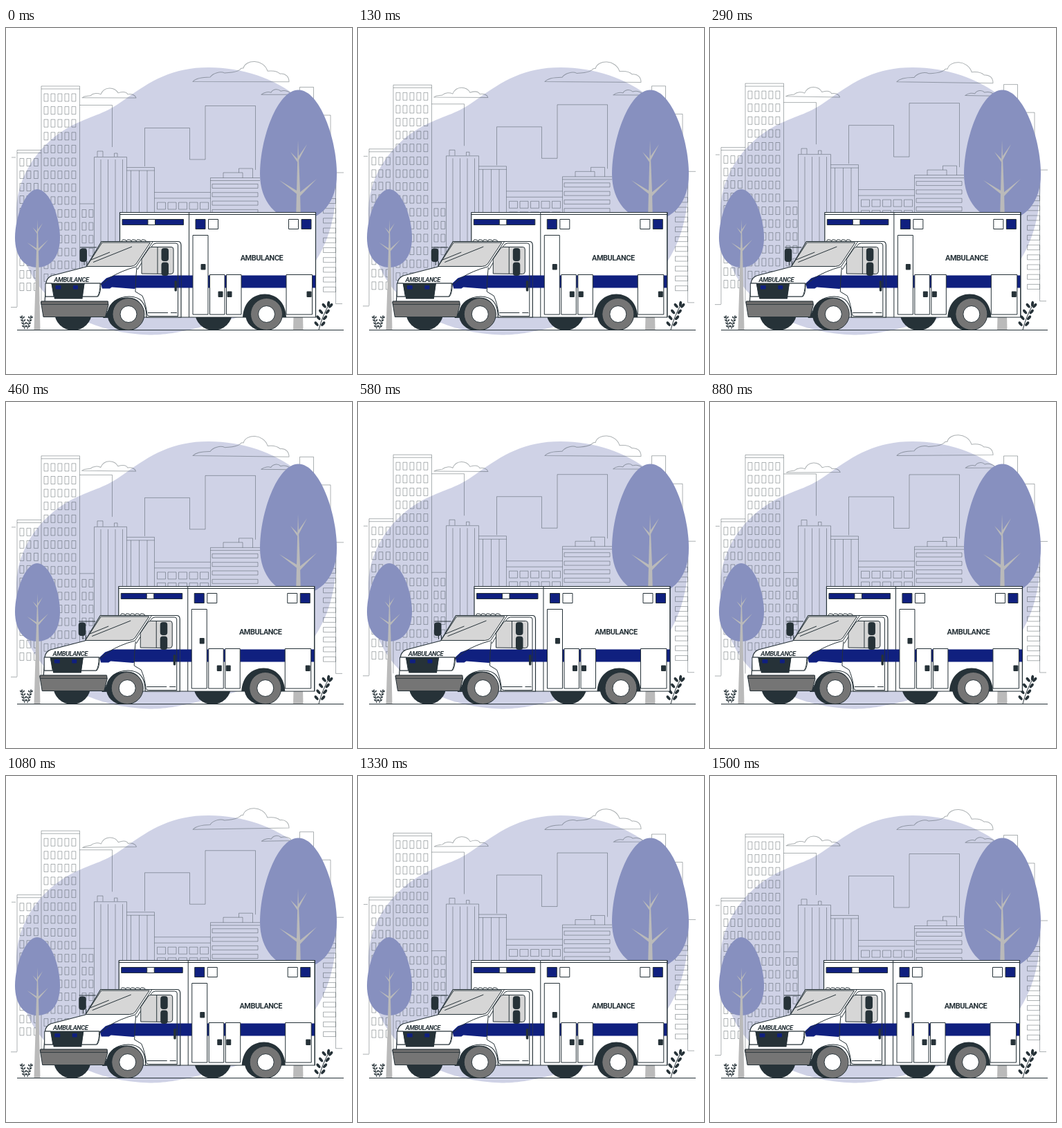
Write an HTML page with a canvas that moves like this. It is 500x500 px and loops after 1.54 s.

```html
<!DOCTYPE html>
<html lang="en">
<head>
<meta charset="utf-8">
<title>Ambulance in the city</title>
<style>
html, body { margin: 0; width: 100%; height: 100%; overflow: hidden; background: #fff; }
canvas { display: block; width: 500px; height: 500px; }
</style>
</head>
<body>
<canvas id="stage"></canvas>
<script>
const canvas = document.getElementById('stage');
const ctx = canvas.getContext('2d');
const ratio = window.devicePixelRatio || 1;
canvas.width = canvas.height = 500 * ratio;

const LOOP = 1540, FPS = 24, PERIOD = 1.5;
const DARK = '#263238', BLUE = '#10207f', LEAF = '#8790bf', WOOD = '#bababa',
      GLASS = '#d6d6d6', TYRE = '#757575', BLOB = '#cfd2e6', FAINT = 'rgba(38,50,56,.38)';

function paint(path, fill, stroke, width = 1) {
  if (fill) { ctx.fillStyle = fill; ctx.fill(path); }
  if (stroke) { ctx.strokeStyle = stroke; ctx.lineWidth = width; ctx.stroke(path); }
}

const shape = (d, fill, stroke, width) => paint(new Path2D(d), fill, stroke, width);
const line = d => shape(d, null, DARK);
const faint = d => shape(d, null, FAINT);

function box(x, y, w, h, fill, stroke = DARK, r = 0, width = 1) {
  const path = new Path2D();
  path.roundRect(x, y, w, h, r);
  paint(path, fill, stroke, width);
}

function oval(x, y, rx, ry, fill, stroke, turn = 0) {
  const path = new Path2D();
  path.ellipse(x, y, rx, ry, turn, 0, Math.PI * 2);
  paint(path, fill, stroke);
}

function grid(xs, y, rows, step, w, h) {
  for (let row = 0; row < rows; row++)
    for (const x of xs) box(x, y + row * step, w, h, null, FAINT);
}

// Linear interpolation through [position, value] keys
function track(keys, p) {
  const i = keys.findIndex(k => k[0] > p);
  const [a, from] = keys[i - 1], [b, to] = keys[i];
  return from + (to - from) * (p - a) / (b - a);
}

const SWAY = [[0, 0], [.25, 1], [.75, -1], [1, 0]];
const FLOAT = [[0, 0], [.5, -10], [1, 0]];
const SHAKE = [[0, 0], [.1, -1], [.2, 2], [.3, -4], [.4, 4], [.5, -4],
               [.6, 4], [.7, -4], [.8, 2], [.9, -1], [1, 0]];

function drawBlob() {
  shape('M15 262C17 210 50 165 95 141C130 124 142 125 172 103C210 76 240 57 293 57' +
        'C390 57 478 120 478 215C478 290 456 330 430 360C380 410 330 420 290 430' +
        'C250 441 225 443.500 208 443.500C130 441 70 410 40 362C22 330 14 300 15 262Z', BLOB);
}

function drawCity() {
  // Left towers
  faint('M51 400V84H106.500V400M51 88H106.500');
  grid([55, 65, 75, 85, 95], 95, 15, 18.6, 5.8, 11);
  faint('M8 187H14M16 403V176.500H51M16 180.500H51M7 403.500H16');
  grid([20, 30, 40.5], 188.5, 11, 18, 5.8, 11);
  grid([110, 120], 262.5, 5, 18.6, 5.8, 11);
  // Middle blocks
  faint('M106.500 111.500H153.500V172M106.500 254H127.500');
  faint('M127.500 350V186.500H174.500V320M137 190V320M147.500 190V320M158 190V320M168.500 190V320');
  faint('M132 186V178H140V186M156.500 186V181H161V186');
  faint('M174.500 201.500H214.500V320M174.500 206H214.500M180.500 206V320M192.500 206V320M204 206V320');
  faint('M200.500 200V144.500H265.500V190H288V112.500H360.500V205');
  faint('M214.500 237.500H295.500M214.500 246H295.500');
  grid([218.5, 234, 249.5, 265, 280.5], 252, 3, 15.5, 12, 10);
  faint('M295.500 300V216.500H367M295.500 220.500H367M314 216.500V209H342V216.500M336.500 209V203H356.500V216.500');
  grid([298], 225.5, 5, 12.3, 66, 6);
  // Right towers
  faint('M424.500 120V85.500H444.500V126H469V216M476.500 398.500V209M476.500 209H488M476.500 398.500H486');
  grid([458.5], 246.5, 10, 14.2, 18, 7);
}

function drawClouds() {
  faint('M110 101C114 98 118 99 122 98C126 94 133 94 137 96C142 84 157 85 162 94' +
        'C168 92 174 92 176 96C182 95 187 97 188 101Z');
  faint('M270 77.500C274 73 284 71 295 71C299 65 310 62 316 65C324 64 331 65 338 60' +
        'C340 57 342 58 343 58C346 45 372 44 378 62C387 61 393 63 396 66C404 65 409 70 409 77.500Z');
  faint('M369 96C374 92 380 92 383 93C386 88 393 87 397 91C404 89 411 92 412 96Z');
}

// A tapering branch from its root to its tip
function branch(x, y, tipX, tipY, width) {
  const half = width / 2;
  shape(`M${x} ${y - half}L${tipX} ${tipY}L${x} ${y + half}Z`, WOOD);
}

function drawTrees() {
  shape('M422.500 89.500C392 89.500 367 160 367 211C367 251 391 277 422.500 278' +
        'C456 278 478 251 478 211C478 160 453 89.500 422.500 89.500Z', LEAF);
  shape('M422 162L425 237L429.500 437H415L420 237Z', WOOD);
  branch(421.5, 192, 411, 179, 5);
  branch(423, 188, 435, 168, 6);
  branch(421, 238, 395, 220, 5);
  branch(424, 241, 449, 218, 6);
  shape('M45 233C28 233 13 273 13 303C13 330 26 346 45 346C65 346 78 330 78 303' +
        'C78 273 63 233 45 233Z', LEAF);
  shape('M45.500 277L47 321L49.500 437H40.500L44 321Z', WOOD);
  branch(45, 296, 38.5, 288, 3);
  branch(46, 293, 53, 282, 3.5);
  branch(44.5, 320, 30.5, 310, 3);
  branch(46.5, 321, 61, 306, 4);
}

// A stem with leaves in pairs, each leaf pointing up and outwards
function drawSprig(x, y, lean, height, pairs, size) {
  line(`M${x} ${y}Q${x + lean * .35} ${y - height * .55} ${x + lean} ${y - height}`);
  for (let i = 0; i < pairs; i++) {
    const k = (i + .7) / pairs;
    const cx = x + lean * (.5 * k + .5 * k * k), cy = y - height * k;
    for (const side of [-1, 1])
      oval(cx + side * size * 1.2, cy - size * .6, size * .5, size, DARK, null, side * .7);
  }
  oval(x + lean, y - height - size * .6, size * .5, size, DARK, null, .15);
}

function drawPlants() {
  drawSprig(452, 436, 14, 35, 4, 4);
  drawSprig(27, 435, -4, 17, 4, 1.8);
  drawSprig(31, 435, 5, 17, 4, 1.8);
}

function sign(x, baseline, size, style) {
  ctx.font = `${style} 600 ${size}px Roboto, sans-serif`;
  ctx.letterSpacing = '-0.4px';
  ctx.textAlign = 'center';
  ctx.fillStyle = DARK;
  ctx.fillText('AMBULANCE', x, baseline);
}

function wheel(x) {
  oval(x - 7, 413.5, 23.5, 23.5, DARK);
  oval(x, 413.5, 23, 23, TYRE, DARK);
  oval(x, 413.5, 12, 12, '#fff', DARK);
}

const handle = (x, y) => box(x, y, 7, 8.5, DARK, null, 1);

function drawCabin() {
  // Far mirror and roof lamps
  line('M107 317H131M113 337V343M117 337V343');
  box(106.5, 318.5, 10.5, 19.5, DARK, null, 4);
  for (let i = 0; i < 5; i++) oval(171 + i * 7, 308, 3.6, 2, '#fff', DARK, .25);

  // Shell, bonnet and door
  shape('M138 308.500H249Q253 309 253 314V418H203C203 398 194 388 178 388' +
        'C160 388 151 398 148 410L56 396L58 368Q59 361 66 358L116 345Z', '#fff', DARK, 1.2);
  shape('M137 369L145 361.500L156 357.500H253V375.500H187L186 377L153 374.500L150 376.500H139Z', BLUE);
  shape('M139 310H208.500L188 341Q185 344.500 180 344.500H116.500Z', GLASS, DARK);
  line('M126 338.500L182 316M123 335L150 324');
  line('M212 309L188 345Q166 351 150 361L137 371');
  line('M189 346Q187 363 187 381L197 387Q202 398 204 414Q204 416.500 208 416.500H249');
  line('M248.500 416V314Q248.500 311 245 311H217Q213 311 211 315L190 349');
  shape('M196 355V334L207 318Q208.500 316.500 211 316.500H239Q242 316.500 242 320V352' +
        'Q242 355.500 238 355.500Z', GLASS, DARK);
  line('M219 317V355');
  box(224.5, 318, 10.5, 19, DARK, null, 4);
  box(224.5, 338.5, 10.5, 19.5, DARK, null, 4);
  box(243.5, 365, 3.5, 15.5, DARK, null, 1.5);
  line('M205 411.500H234M238 411.500H247');

  // Front
  line('M57 369H137M137 369Q137 383 133 388H57');
  shape('M57 369H66L69 388H57Z', '#fff', DARK);
  shape('M113 369H136Q136 383 132 388H110Z', '#fff', DARK);
  shape('M65.500 369H113.500L110.500 391.500H70Z', DARK);
  box(71.5, 372, 8, 5.5, BLUE, null, 1);
  box(97, 372, 7, 5.5, BLUE, null, 1);
  sign(94.5, 366.5, 9.3, 'italic');
}

function drawAmbulance() {
  oval(97, 410.5, 27, 26.5, DARK);
  oval(300, 410.5, 27, 26.5, DARK);

  // Rear module
  box(164.5, 266.5, 283, 151.5, '#fff', DARK, 0, 1.2);
  line('M164 269.500H448M264.500 266V418');
  box(253, 357.5, 194.5, 18, BLUE, null);
  line('M447.500 266V418');
  box(168, 276.5, 88.5, 8, BLUE);
  box(205, 276.5, 10.5, 8, '#fff');
  box(274, 276.5, 14, 14, BLUE);
  box(292.5, 276.5, 14, 14, '#fff');
  box(408.5, 276.5, 14, 14, '#fff');
  box(427, 276.5, 14, 14, BLUE);
  for (const [x, y, w] of [[270, 299.5, 22], [294.5, 356.5, 21.5], [318.5, 356.5, 21.5], [405, 356.5, 37.5]])
    box(x, y, w, 414 - y, '#fff');
  handle(281.5, 341);
  for (const x of [306.5, 319.5, 434.5]) handle(x, 380.5);
  sign(369.5, 336, 10.9, 'normal');
  shape('M342 418C343 398 356 384.500 374 384.500C392 384.500 404 398 405 418Z', DARK);

  drawCabin();
  shape('M140 419L148 408C152 397 162 389.500 176 389.500C186 389.500 193 394 197 402V418Z', DARK);
  shape('M51 399L50.500 396Q50.500 395 52 395H147L148 400L143.500 417.500H54Z', TYRE, DARK);
  shape('M51 395H147.500V399.500H51Z', '#6b6b6b', DARK, .8);
  wheel(177);
  wheel(376.5);
}

function moved(x, y, draw) {
  ctx.save();
  ctx.translate(x, y);
  draw();
  ctx.restore();
}

function render(now) {
  const step = Math.min(36, Math.floor((now % LOOP + 5) * FPS / 1000));
  const phase = ((step / FPS + .03) / PERIOD) % 1;

  ctx.setTransform(ratio, 0, 0, ratio, 0, 0);
  ctx.fillStyle = '#fff';
  ctx.fillRect(0, 0, 500, 500);
  ctx.lineJoin = 'round';

  drawBlob();
  moved(0, .4 + track(FLOAT, phase), drawCity);
  moved(261, 75, () => {
    ctx.rotate(track(SWAY, phase) * Math.PI / 180);
    ctx.translate(-261, -75);
    drawClouds();
  });
  drawTrees();
  drawPlants();
  line('M16 436.500H488');
  moved(.2 + track(SHAKE, phase), 0, drawAmbulance);
}

const start = performance.now();
function tick() {
  render(performance.now() - start);
  requestAnimationFrame(tick);
}
tick();
</script>
</body>
</html>
```
